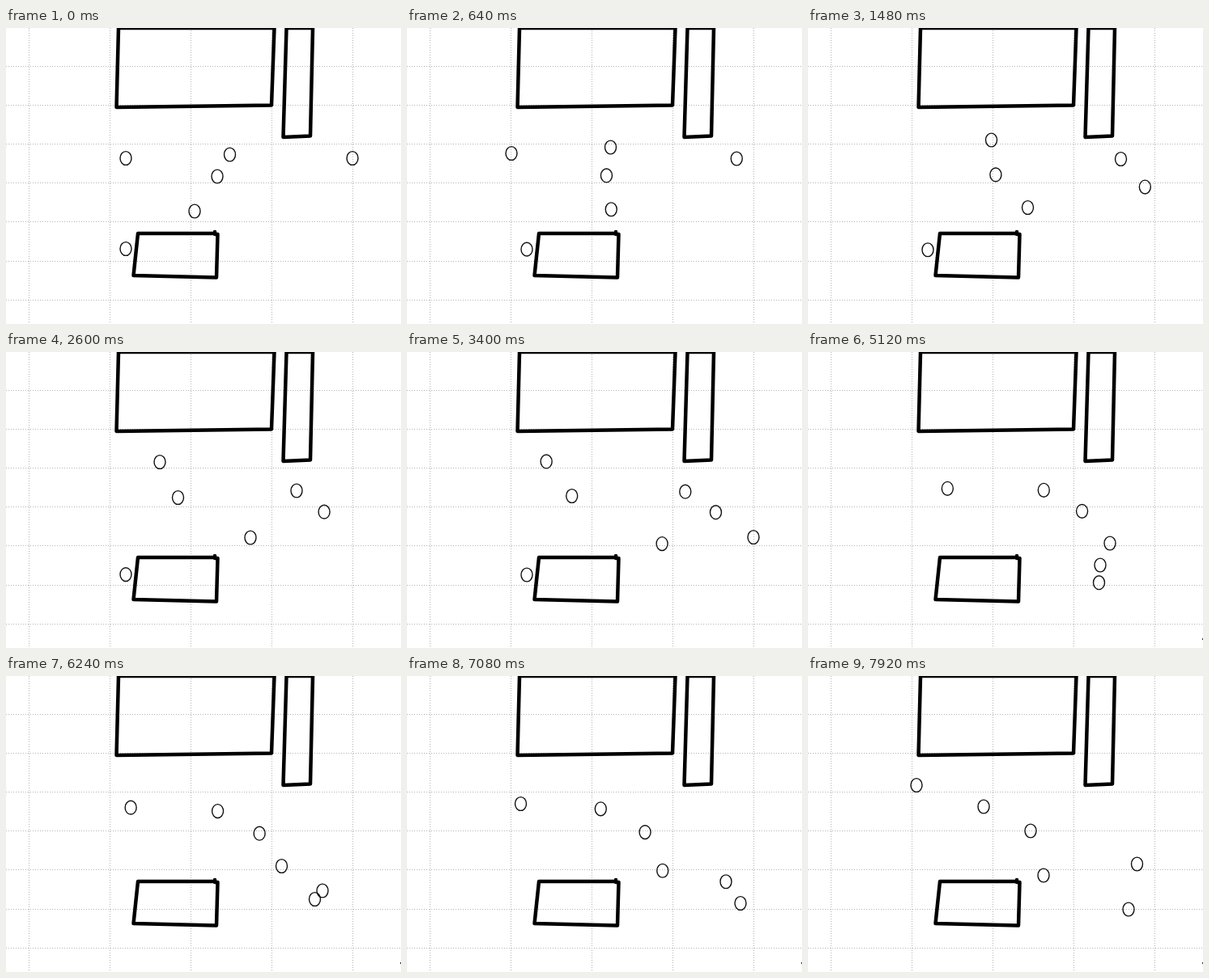
An HTML page that plays this animation: 488x366 px, repeating every 8000 ms.

```html
<!DOCTYPE html>
<html lang="en">
<head>
<meta charset="utf-8">
<title>Tracked points</title>
<style>
  html, body { margin: 0; width: 100%; height: 100%; overflow: hidden; background: #fff; }
  svg { display: block; width: 488px; height: 366px; }
  .grid { stroke: #b4b4b4; stroke-width: 1; stroke-dasharray: 1 2; }
  .walls { fill: none; stroke: #000; stroke-width: 4.5; stroke-linejoin: round; }
  .dots { fill: none; stroke: #111; stroke-width: 1.4; }
</style>
</head>
<body>
<svg viewBox="0 0 488 366">
  <g class="grid" id="grid"></g>
  <g class="walls">
    <path d="M139 0 L136.5 98 L328 95.5 L331.5 0 Z"/>
    <path d="M346.5 0 L342.5 135 L376 133.5 L379 0 Z"/>
    <path d="M163 254 L258 254 V252 V255 H261.5 L260 308.5 L157.5 306 Z"/>
  </g>
  <g class="dots" id="dots"></g>
  <rect id="speck" x="487" y="354" width="1" height="2" fill="#333"/>
</svg>
<script>
const LOOP = 8000, STEP = 280, FIRST = 80;
const NS = "http://www.w3.org/2000/svg";

// Each track is a list of [step, x, y]; it is visible from its first to its last step.
const tracks = [
  [[-1, 148, 161], [2, 129, 155]],
  [[-1, 276.5, 156.5], [5, 226.5, 138.5], [9, 190, 136], [16, 127.5, 134]],
  [[-1, 261, 183.5], [9, 212.5, 180], [14, 190.5, 175], [25, 140.5, 158]],
  [[-1, 233, 226.5], [5, 271.5, 222], [9, 302, 229.5], [18, 361, 263.5], [22, 391, 265.5], [25, 412, 281]],
  [[-1, 148, 273], [11, 148, 275.5]],
  [[-1, 428, 161], [5, 386.5, 162], [9, 359, 171.5], [14, 321, 174.5], [28, 217, 161.5]],
  [[3, 428, 196], [14, 364, 199], [28, 275, 191.5]],
  [[11, 428, 229], [14, 403, 232], [18, 373, 236.5], [22, 340.5, 235], [28, 291, 246.5]],
  [[17, 354, 287.5], [22, 381.5, 276], [28, 406.5, 232.5]],
  [[26, 128, 115], [28, 134, 135]],
  [[28, 396, 288.5]]
];

function add(parent, tag, attrs) {
  const node = document.createElementNS(NS, tag);
  for (const name in attrs) node.setAttribute(name, attrs[name]);
  return parent.appendChild(node);
}

const grid = document.getElementById("grid");
const dots = document.getElementById("dots");
const speck = document.getElementById("speck");

for (let x = 28.5; x < 488; x += 100) add(grid, "line", { x1: x, x2: x, y1: 0, y2: 366 });
for (let i = 0; i < 7; i++) {
  const y = Math.floor(47 + i * 48.2) + 0.5;
  add(grid, "line", { x1: 0, x2: 488, y1: y, y2: y });
}
const ellipses = tracks.map(() => add(dots, "ellipse", { rx: 7, ry: 8.4 }));

function position(track, step) {
  const last = track[track.length - 1];
  if (step < track[0][0] || step > last[0]) return null;
  const next = track.findIndex(key => key[0] >= step);
  const b = track[next], a = track[next - 1] || b;
  const part = a === b ? 0 : (step - a[0]) / (b[0] - a[0]);
  return [a[1] + (b[1] - a[1]) * part, a[2] + (b[2] - a[2]) * part];
}

function draw(time) {
  const step = Math.floor((time - FIRST) / STEP);
  tracks.forEach((track, i) => {
    const at = position(track, step);
    ellipses[i].style.display = at ? "" : "none";
    if (!at) return;
    ellipses[i].setAttribute("cx", at[0]);
    ellipses[i].setAttribute("cy", at[1]);
  });
  speck.style.display = step >= 13 ? "" : "none";
}

const start = performance.now();
function tick() {
  draw((performance.now() - start) % LOOP);
  requestAnimationFrame(tick);
}
tick();
</script>
</body>
</html>
```
